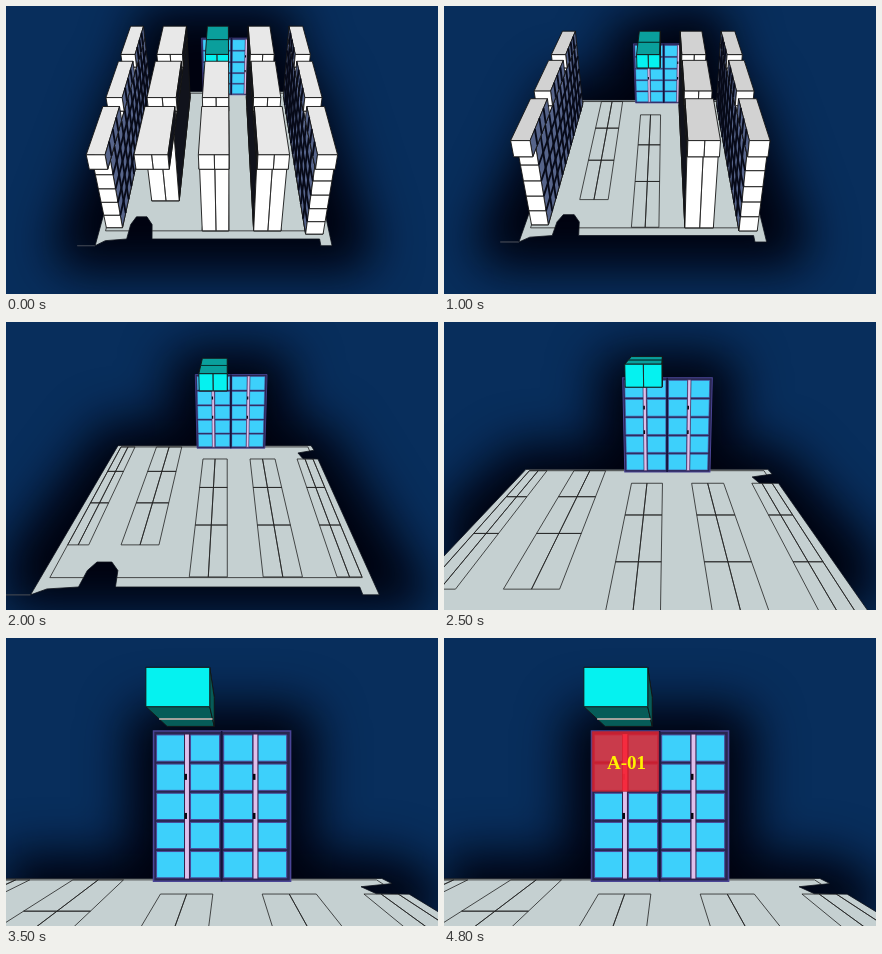
These frames come from a looping animation (432 px wide and 288 px high, 5800 ms). An HTML page with a canvas:

```html
<!DOCTYPE html>
<html lang="en">
<head>
<meta charset="utf-8">
<title>Shelf locator</title>
<style>
html, body { margin: 0; overflow: hidden; background: #082e5c; }
canvas { display: block; }
</style>
</head>
<body>
<canvas id="stage" width="432" height="288"></canvas>
<script>
const stage = document.getElementById('stage').getContext('2d');
const layer = document.createElement('canvas');
layer.width = 432;
layer.height = 288;
const shade = layer.getContext('2d');
let ctx = stage;

// World: x across, y up, z from the back of the floor towards the viewer.
// Each half second has its own camera: pitch in degrees, x, and the distance
// and drop of the floor's back edge; then the racks that still stand.
const views = [
  { pitch: 38, x: 0.6, far: 33.25, drop: -3.66, racks: [0, 1, 2, 4, 3] },
  { pitch: 35.5, x: 0.77, far: 33.1, drop: -3.4, racks: [0, 2, 4, 3] },
  { pitch: 33, x: 0.95, far: 32.9, drop: -3.09, racks: [0, 4, 3] },
  { pitch: 28.5, x: 0.43, far: 31.5, drop: -2.26, racks: [0, 4] },
  { pitch: 22.5, x: 0.67, far: 27.6, drop: -1.02, racks: [] },
  { pitch: 16, x: 0.78, far: 22, drop: 0.2, racks: [] },
  { pitch: 9.5, x: 0.9, far: 16.6, drop: 1.5, racks: [] },
  { pitch: 0, x: 1.01, far: 13.76, drop: 2.61, racks: [] }
];

// Footprints: left, right, back and front edge; front is where the rack ends.
const racks = [
  { x0: -5, x1: -4.25, back: 0, end: 10, front: 11.8, wall: true },
  { x0: -3.1, x1: -1.75, back: 0, end: 10, front: 10 },
  { x0: -0.54, x1: 0.68, back: 1.74, end: 11.96, front: 12 },
  { x0: 1.83, x1: 3.09, back: 1.74, end: 11.96, front: 12 },
  { x0: 4.2, x1: 5, back: 1.74, end: 11.96, front: 12.2, wall: true }
];
const SHELF = 4.05, TOP = 4.8;
const crateAt = i => ({ y0: SHELF, y1: TOP, z0: 0.4 + i * 4.25, z1: 3.9 + i * 4.25 });

const floor = [
  [-5.3, 12.9], [-5.2, -0.2], [5.2, -0.2], [5.25, 0.5], [4.35, 0.9], [4.5, 1.7], [5.25, 1.75],
  [5.3, 12.9], [4.8, 12.9], [4.8, 12.5], [-2.8, 12.5], [-2.9, 11.6], [-3.2, 11.1], [-3.7, 11.1],
  [-3.9, 11.6], [-3.95, 12.5], [-4.9, 12.6]
].map(([x, z]) => [x, 0, z]);

let cam, sin, cos, eye;
function aim(view) {
  cam = view;
  sin = Math.sin(view.pitch * Math.PI / 180);
  cos = Math.cos(view.pitch * Math.PI / 180);
  eye = view.far * sin + view.drop * cos;
}

function project([x, y, z]) {
  const k = 516 / (cam.far - z * cos - y * sin);
  return [221 + k * (x - cam.x), 144 + k * (cam.drop + z * sin - y * cos)];
}

const front = ({ x0, x1, y0, y1, z1 }) => [[x0, y1, z1], [x1, y1, z1], [x1, y0, z1], [x0, y0, z1]];
const side = ({ y0, y1, z0, z1 }, x) => [[x, y1, z1], [x, y1, z0], [x, y0, z0], [x, y0, z1]];
const flat = ({ x0, x1, z0, z1 }, y) => [[x0, y, z0], [x1, y, z0], [x1, y, z1], [x0, y, z1]];

// Point of a face at fractions u (along) and v (down), and a part of a face.
const at = ([a, b, , d], u, v) => a.map((n, k) => n + (b[k] - n) * u + (d[k] - n) * v);
const part = (f, u0, v0, u1, v1) => [at(f, u0, v0), at(f, u1, v0), at(f, u1, v1), at(f, u0, v1)];
const steps = n => Array.from({ length: n - 1 }, (_, i) => (i + 1) / n);

function poly(points, fill, line = '#151515', width = 0.9) {
  ctx.beginPath();
  for (const p of points) ctx.lineTo(...project(p));
  ctx.closePath();
  if (fill) { ctx.fillStyle = fill; ctx.fill(); }
  if (line) { ctx.strokeStyle = line; ctx.lineWidth = width; ctx.stroke(); }
}

function rule(face, us, vs, color = '#222', width = 0.8) {
  for (const u of us) poly([at(face, u, 0), at(face, u, 1)], null, color, width);
  for (const v of vs) poly([at(face, 0, v), at(face, 1, v)], null, color, width);
}

const cabinet = front({ x0: -0.92, x1: 2.68, y0: 0, y1: 3.95, z1: 0.2 });

function drawHalo() {
  ctx = shade;
  ctx.clearRect(0, 0, 432, 288);
  ctx.lineJoin = 'round';
  const cover = face => poly(face, '#00020f', '#00020f', 52);
  cover([[-5.2, 0, 0], [5.2, 0, 0], [6, 0, 12.9], [-6, 0, 12.9]]);
  cover(cabinet);
  for (const i of cam.racks.filter(i => !racks[i].wall))
    cover(flat({ ...racks[i], z0: 0.4, z1: 12 }, TOP));
  ctx = stage;
  ctx.filter = 'blur(24px)';
  ctx.drawImage(layer, 0, 0);
  ctx.filter = 'none';
}

function drawFloor() {
  poly([[-6.1, 0, 12.9], floor[0]], null, '#39404c');
  poly(floor, '#c5d0d1', '#10141c', 0.8);
  ctx.save();
  ctx.clip();
  poly(flat({ x0: -5, x1: 5, z0: 0, z1: 12 }, 0), null, '#222', 0.8);
  for (const r of racks) {
    const foot = flat({ ...r, z0: r.back, z1: r.end }, 0);
    poly(foot, null, '#222', 0.8);
    rule(foot, [0.5], steps(3));
  }
  ctx.restore();
}

function drawCabinet() {
  const k = 516 / cam.far / 37.5;
  poly(cabinet, '#29264f', '#4a4596', 1.6 * k);
  for (const u of [0.022, 0.27, 0.512, 0.76])
    for (let i = 0; i < 5; i++) {
      const v = 0.026 + i * 0.194;
      poly(part(cabinet, u, v, u + 0.212, v + 0.175), '#3dd0fb', '#4a4798', k);
    }
  for (const u of [0.226, 0.726]) {
    poly(part(cabinet, u, 0.02, u + 0.036, 0.985), '#dfc0ec', '#34204c', k);
    for (const v of [0.285, 0.545]) poly(part(cabinet, u, v, u + 0.018, v + 0.04), '#080810', null);
  }
  rule(cabinet, [0.497], [], '#14143a', 1.5);
}

function drawBox(b, topColor, sideColor, faceColor, baseColor) {
  const lids = [[b.y0, baseColor], [b.y1, topColor]];
  if (eye < b.y1) lids.reverse();
  for (const [y, color] of lids) poly(flat(b, y), color);
  if (b.x1 < cam.x) poly(side(b, b.x1), sideColor);
  if (b.x0 > cam.x) poly(side(b, b.x0), sideColor);
  poly(front(b), faceColor);
}

function drawTealCrate() {
  const b = { ...racks[2], ...crateAt(0) };
  drawBox(b, '#0a9f9c', '#065c58', '#05f2f0', '#065c58');
  if (eye > TOP) {
    rule(flat(b, TOP), [], [0.5], '#06302f');
    rule(front(b), [0.5], []);
  } else if (eye < SHELF) {
    rule(flat(b, SHELF), [], [0.45], '#d8b9b4', 1.5);
  }
}

function drawRack(index, gray) {
  const r = racks[index], first = index === 2 ? 1 : 0;
  const body = { ...r, y0: 0, y1: SHELF, z0: crateAt(first).z0, z1: r.front };
  const lid = `rgb(${gray},${gray},${gray})`;
  const dark = r.wall ? '#56648a' : '#11131c';
  const lattice = (b, columns, rows) => {
    if (r.wall) rule(side(b, index ? r.x0 : r.x1), steps(columns), steps(rows), '#070a18', 1.9);
  };
  drawBox(body, '#fff', dark, '#fff', '#fff');
  lattice(body, 12, 5);
  rule(front(body), r.wall ? [] : [0.52], r.wall ? steps(5) : []);
  for (let i = first; i < 3; i++) {
    const crate = { ...r, ...crateAt(i) };
    drawBox(crate, lid, dark, '#fff', '#fff');
    lattice(crate, 4, 1);
    if (!r.wall) rule(front(crate), [0.52], []);
  }
}

function draw(index, marked) {
  aim(views[index]);
  ctx.fillStyle = '#082e5c';
  ctx.fillRect(0, 0, 432, 288);
  drawHalo();
  drawFloor();
  drawCabinet();
  drawTealCrate();
  for (const i of cam.racks) drawRack(i, 232 - 5.5 * index * index);
  if (marked) {
    poly(part(cabinet, 0.005, 0.005, 0.49, 0.4), 'rgba(228,32,42,.84)', '#b02a3c', 1);
    poly(part(cabinet, 0.226, 0.02, 0.262, 0.4), 'rgba(250,40,60,.8)', null);
    ctx.fillStyle = '#fff200';
    ctx.font = 'bold 19px "Liberation Serif", serif';
    ctx.textAlign = 'center';
    ctx.fillText('A-01', 182.5, 131);
  }
}

let last = '';
function tick() {
  const t = performance.now() % 5800;
  const index = Math.min(Math.floor(t / 500), 7);
  const marked = t >= 4800 || (t >= 4000 && Math.floor((t - 4000) / 200) % 2 === 0);
  const key = index + ':' + marked;
  if (key !== last) draw(index, marked);
  last = key;
  requestAnimationFrame(tick);
}
tick();
</script>
</body>
</html>
```
